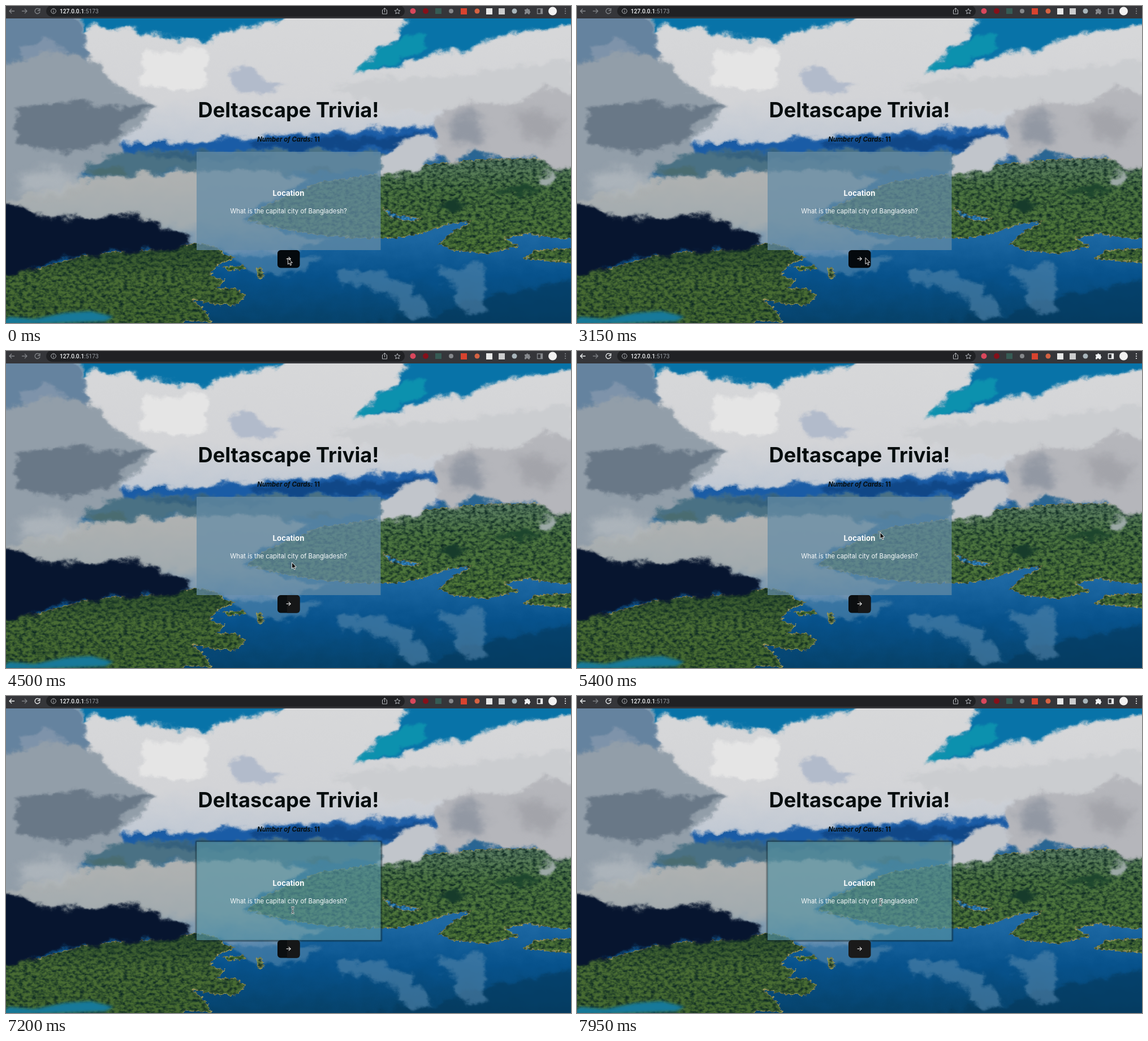
An HTML page for the animation above (8 s loop, 999 px wide and 561 px high).

```html
<!DOCTYPE html>
<html lang="en">
<head>
<meta charset="utf-8">
<title>Trivia cards</title>
<style>
html, body { margin: 0; width: 100%; height: 100%; overflow: hidden; background: #0a5488; }
svg { position: absolute; left: 0; top: 0; width: 999px; height: 561px; }
#scene { will-change: transform; }
text { font-family: Inter, sans-serif; font-size: 11.3px; text-anchor: middle; }
.soft { filter: blur(2.5px); }
.haze { filter: blur(8px); }
#bar text { font: 500 10.2px Roboto, sans-serif; text-anchor: start; }
.line { fill: none; stroke: currentColor; stroke-width: 1.3; }
#nav, #tools { color: #85888c; }
.focused #nav, .focused #tools { color: #f1f3f4; }
#card { fill: rgb(101, 140, 165); fill-opacity: .74; }
.hover #card { fill: rgb(86, 146, 162); fill-opacity: .68; }
#shadow { display: none; filter: blur(1.3px); }
.hover #shadow { display: inline; }
</style>
</head>
<body>
<svg id="scene" viewBox="0 0 999 561">
  <defs>
    <linearGradient id="cloud" x2="0" y2="1">
      <stop stop-color="#d8d9da"/><stop offset=".65" stop-color="#d3d4d7"/><stop offset="1" stop-color="#bcc6d3"/>
    </linearGradient>
    <linearGradient id="sea" x2="0" y2="1">
      <stop stop-color="#2b6590"/><stop offset=".45" stop-color="#1d68a3"/><stop offset=".65" stop-color="#07528c"/><stop offset=".9" stop-color="#064168"/>
    </linearGradient>
    <linearGradient id="lake" x2="0" y2="1">
      <stop stop-color="#b0b2b1"/><stop offset=".6" stop-color="#a2abaf"/><stop offset="1" stop-color="#5686b0"/>
    </linearGradient>
    <linearGradient id="forest" x2="0" y2="1">
      <stop stop-color="#5d7f66"/><stop offset=".35" stop-color="#4c7440"/><stop offset="1" stop-color="#4f7635"/>
    </linearGradient>
    <linearGradient id="grove" x2="0" y2="1">
      <stop stop-color="#2f4f2c"/><stop offset=".4" stop-color="#4a6d34"/><stop offset="1" stop-color="#44682f"/>
    </linearGradient>
    <filter id="rough" filterUnits="userSpaceOnUse" x="-40" y="-20" width="1080" height="620" color-interpolation-filters="sRGB">
      <feTurbulence type="fractalNoise" baseFrequency=".035 .045" numOctaves="4" seed="5"/>
      <feDisplacementMap in="SourceGraphic" scale="26" xChannelSelector="R" yChannelSelector="G"/>
    </filter>
    <filter id="leaf" filterUnits="userSpaceOnUse" x="-40" y="200" width="1080" height="400" color-interpolation-filters="sRGB">
      <feTurbulence type="fractalNoise" baseFrequency=".13 .19" numOctaves="3" seed="8" result="noise"/>
      <feDisplacementMap in="SourceGraphic" in2="noise" scale="9" xChannelSelector="R" yChannelSelector="G" result="land"/>
      <feColorMatrix in="noise" values="0 0 0 0 .06  0 0 0 0 .17  0 0 0 0 .14  2.2 0 0 0 -.8"/>
      <feComposite in2="land" operator="in" result="shade"/>
      <feMerge><feMergeNode in="land"/><feMergeNode in="shade"/></feMerge>
    </filter>
  </defs>

  <g filter="url(#rough)">
    <rect x="-40" y="-20" width="1080" height="280" fill="url(#cloud)"/>
    <g class="soft">
      <g fill="#0873a8">
        <polygon points="118,-20 500,-20 488,27 430,37 376,48 362,62 325,64 295,55 225,42 190,40 158,33 135,48"/>
        <polygon points="745,-20 1040,-20 1040,40 975,34 925,44 862,56 818,78 765,84 720,98 660,115 612,118 640,92 685,62 700,30"/>
      </g>
      <polygon points="640,94 690,62 745,50 735,78 690,100 645,115 612,117" fill="#0c91ae"/>
      <polygon points="240,82 355,78 355,142 300,148 238,138" fill="#e5e5e5"/>
      <polygon points="390,118 425,98 448,128 490,140 450,157 405,148" fill="#b2bbcb"/>
      <polygon points="570,140 690,128 820,120 999,95 999,180 820,190 680,185" fill="#cbcdd0"/>
    </g>
    <rect x="-40" y="245" width="1080" height="355" fill="url(#sea)"/>
    <g class="soft">
      <polygon points="190,240 260,244 340,240 430,232 560,226 690,217 765,212 775,265 600,268 400,262 200,262" fill="#1a5ca6"/>
      <polygon points="430,242 540,234 640,234 735,224 750,250 580,253 440,252" fill="#104787"/>
      <polygon points="120,275 210,257 330,258 520,254 700,262 690,294 560,290 410,298 290,291 190,303 140,301" fill="#4a7184"/>
      <polygon points="240,262 360,259 480,263 440,274 300,273" fill="#34607d"/>
      <polygon points="-40,335 80,316 155,304 240,296 350,292 480,292 540,310 435,355 420,380 490,400 570,415 450,445 350,430 260,400 120,390 -40,372" fill="url(#lake)"/>
      <polygon points="145,288 205,284 215,295 160,300" fill="#4a6c70"/>
      <polygon points="535,287 570,285 580,294 545,298" fill="#385c68"/>
      <polygon points="640,561 760,545 870,510 1040,480 1040,600 640,600" fill="#06395c" opacity=".6"/>
      <g fill="#5687ac" opacity=".6">
        <polygon points="586,470 612,460 630,475 660,468 690,486 722,495 705,535 680,508 650,505 625,490 595,492"/>
        <polygon points="765,462 800,470 820,455 850,462 840,500 848,535 815,545 790,520 800,495 775,485"/>
        <polygon points="695,515 730,510 755,540 720,556 690,540"/>
        <polygon points="385,438 460,434 560,446 520,470 480,478 430,470"/>
      </g>
      <polygon points="-40,-20 115,-20 140,62 150,98 105,140 -40,150" fill="#65839f"/>
      <polygon points="20,75 80,60 115,90 90,120 45,115" fill="#7e93aa"/>
      <polygon points="-40,110 90,80 160,95 200,150 270,175 235,215 200,235 205,258 150,275 130,305 80,325 -40,352" fill="#929ea9"/>
      <polygon points="18,180 100,166 180,178 265,174 215,205 195,235 120,262 20,245" fill="#697887"/>
    </g>
  </g>

  <g filter="url(#leaf)" stroke="#a39a5c" stroke-width="1.5">
    <polygon points="428,378 450,358 490,340 555,312 640,300 720,284 830,272 1040,268 1040,408 985,412 920,402 880,412 905,425 850,438 790,432 766,421 790,400 824,380 780,386 735,402 690,410 620,411 555,405 500,397 455,386" fill="url(#forest)"/>
    <polygon points="665,357 695,370 735,376 715,382 680,374" fill="#2f82c0" stroke-width="1.5"/>
    <polygon points="915,446 940,432 1040,428 1040,456 965,452" fill="#4c7236"/>
    <polygon points="-40,462 60,464 150,438 250,432 340,420 374,428 384,440 404,445 374,458 360,476 385,486 372,500 405,500 424,512 405,530 360,526 328,518 352,540 362,560 320,556 270,580 -40,580" fill="url(#grove)"/>
    <polygon points="385,462 420,460 424,465 392,468" fill="#487a32"/>
    <polygon points="441,466 450,463 456,478 447,482" fill="#708b4c"/>
  </g>
  <polygon class="soft" points="5,550 50,554 105,543 150,540 190,550 175,558 70,562 -10,564" fill="#17799a"/>

  <g filter="url(#rough)">
    <g class="soft">
      <polygon points="-40,346 20,352 60,370 120,377 200,371 246,374 285,394 320,406 335,420 285,430 200,432 120,444 60,464 -40,480" fill="#07152f"/>
      <polygon points="755,356 790,347 815,354 790,366" fill="#173b2b"/>
      <polygon points="860,326 910,318 955,326 910,334" fill="#1d452d"/>
      <polygon points="770,190 830,165 890,175 950,145 1040,165 1040,272 975,292 930,266 875,274 835,256 790,278 745,246" fill="#b5b6bb"/>
      <polygon points="665,265 700,238 745,226 770,250 735,286 690,302 660,300" fill="#c1c5cb"/>
      <polygon points="938,300 965,290 966,314 948,318" fill="#9ca9a6"/>
    </g>
    <g class="haze">
      <polygon points="780,205 820,180 850,220 830,250 790,240" fill="#9298a3"/>
      <polygon points="895,195 940,180 985,210 960,245 920,235" fill="#a3a4aa"/>
      <polygon points="30,300 90,285 130,310 85,332 20,330" fill="#b4bbc0" opacity=".75"/>
    </g>
  </g>
</svg>

<svg id="ui" viewBox="0 0 999 561">
  <g id="bar">
    <rect width="999" height="22" fill="#35363a"/>
    <rect x="71" y="-1" width="634" height="20" rx="10" fill="#202124"/>
    <g id="nav" class="line">
      <path d="M15 9H6M10 5L6 9L10 13"/>
      <path d="M28 9H37M33 5L37 9L33 13" stroke="#7c7f83"/>
      <path d="M59 6A4.5 4.5 0 1 0 60 10M60 4V8H56"/>
    </g>
    <g class="line" color="#b4b7bb">
      <circle cx="84" cy="9" r="4.3" stroke-width="1"/><path d="M84 8.5V11.5M84 6V7.2" stroke-width="1"/>
      <path d="M667 7H665.5V14H673.5V7H672M669.5 11V4M667 6L669.5 3.5L672 6" stroke-width="1"/>
      <path d="M692 4.5L693.4 7.7L697 8L694.3 10.3L695.1 13.8L692 12L688.9 13.8L689.7 10.3L687 8L690.6 7.7Z" stroke-width="1"/>
    </g>
    <text x="95" y="12.7" fill="#f1f3f4">127.0.0.1<tspan fill="#9aa0a6" font-weight="400">:5173</tspan></text>
    <circle cx="719.5" cy="9" r="5" fill="#d9475c"/>
    <circle cx="742" cy="9" r="5" fill="#85101a"/>
    <rect x="759" y="4" width="11" height="10" fill="#365b54"/>
    <circle cx="787" cy="9" r="4" fill="#85878a"/>
    <rect x="804" y="4" width="11" height="11" fill="#d8432f"/>
    <circle cx="833" cy="9" r="4.5" fill="#d56343"/>
    <rect x="849" y="4" width="11" height="11" fill="#e8e9e9"/>
    <rect x="871" y="4" width="11" height="11" fill="#cccdce"/>
    <circle cx="899" cy="9" r="4.5" fill="#a8b5bb"/>
    <g id="tools" fill="currentColor">
      <path d="M917 6H920A1.7 1.7 0 0 1 923.4 6H926V9A1.7 1.7 0 0 1 926 12.3V14.5H923A1.7 1.7 0 0 0 919.6 14.5H917V11.5A1.7 1.7 0 0 0 917 8.5Z"/>
      <path d="M939.5 5H948.5V13.5H939.5Z" class="line"/><path d="M945 5H949V14H945Z"/>
      <circle cx="989" cy="5" r="1.1"/><circle cx="989" cy="9" r="1.1"/><circle cx="989" cy="13" r="1.1"/>
    </g>
    <circle cx="966.5" cy="9" r="7.5" fill="#f2f2f2"/>
  </g>

  <text x="499.5" y="197" style="font-size:36.2px;font-weight:700" fill="#060d0e">Deltascape Trivia!</text>
  <text x="499.5" y="240" font-weight="700" fill="#060d0e"><tspan font-style="italic">Number of Cards:</tspan> 11</text>

  <rect id="shadow" x="336.5" y="257.5" width="327" height="175.5" fill="none" stroke="#10262c" stroke-width="2" opacity=".85"/>
  <rect id="card" x="337" y="258" width="325.5" height="174"/>
  <text x="499.5" y="336" style="font-size:13.2px;font-weight:700" fill="#fff">Location</text>
  <text x="499.5" y="367" fill="#f6f9fa">What is the capital city of Bangladesh?</text>

  <rect id="button" x="480" y="432" width="39.5" height="31.5" rx="5.6" fill="#04090d"/>
  <path id="lit" d="M497 432H514Q519.5 432 519.5 437.5V458Q519.5 463.5 514 463.5H497Z" fill="#161718"/>
  <text x="499.7" y="451" fill="#fff" font-weight="500">→</text>

  <path id="arrow" d="M0 0V11.2L2.5 8.9L4.3 13L6.1 12.2L4.4 8.3H7.9Z" fill="#080808" stroke="#fff" stroke-width=".9"/>
  <g id="beam" fill="none">
    <path id="stem" d="M-3 -5.5Q0 -5.5 0 -3.5Q0 -5.5 3 -5.5M0 -3.5V3.5M-3 5.5Q0 5.5 0 3.5Q0 5.5 3 5.5M-1.5 1.5H1.5"/>
    <use href="#stem" stroke="#eef2f2" stroke-width="2.6"/>
    <use href="#stem" stroke="#26373b" stroke-width="1"/>
  </g>
</svg>

<script>
const LOOP = 8000, TICK = 150;
const $ = id => document.getElementById(id);

// Pointer stops: time, x, y.
const stops = [
  [0, 498.5, 446], [1050, 498.5, 446], [1500, 500.5, 446], [3000, 500.5, 446],
  [3150, 510, 445.5], [3600, 562, 446], [3750, 567, 446], [3900, 567, 446],
  [4500, 505.5, 374], [4650, 530, 322], [4800, 530, 322], [5400, 536, 321],
  [5850, 536, 321], [6000, 536.5, 340], [6300, 536.5, 341], [7200, 507, 379],
  [7350, 507, 379], [7950, 536.5, 365]
];

function pointer(t) {
  const next = stops.findIndex(s => s[0] >= t);
  if (next < 1) return stops[0].slice(1);
  const [t0, x0, y0] = stops[next - 1], [t1, x1, y1] = stops[next];
  const k = (t - t0) / (t1 - t0);
  return [x0 + (x1 - x0) * k, y0 + (y1 - y0) * k];
}

function draw(now) {
  const t = now % LOOP, [x, y] = pointer(Math.floor(t / TICK) * TICK);
  const overText = t >= 6600, place = `translate(${x} ${y})`;
  $("ui").classList.toggle("focused", t >= 4950);
  $("ui").classList.toggle("hover", t >= 6000);
  $("button").setAttribute("fill", t >= 7500 ? "#1a1a1a" : t >= 4200 ? "#0b0e10" : "#04090d");
  $("lit").style.display = t >= 4200 && t < 7500 ? "" : "none";
  for (const [id, shown] of [["arrow", !overText], ["beam", overText]]) {
    $(id).style.display = shown ? "" : "none";
    $(id).setAttribute("transform", place);
  }
}

const start = performance.now();
function frame() {
  draw(performance.now() - start);
  requestAnimationFrame(frame);
}
frame();
</script>
</body>
</html>
```
